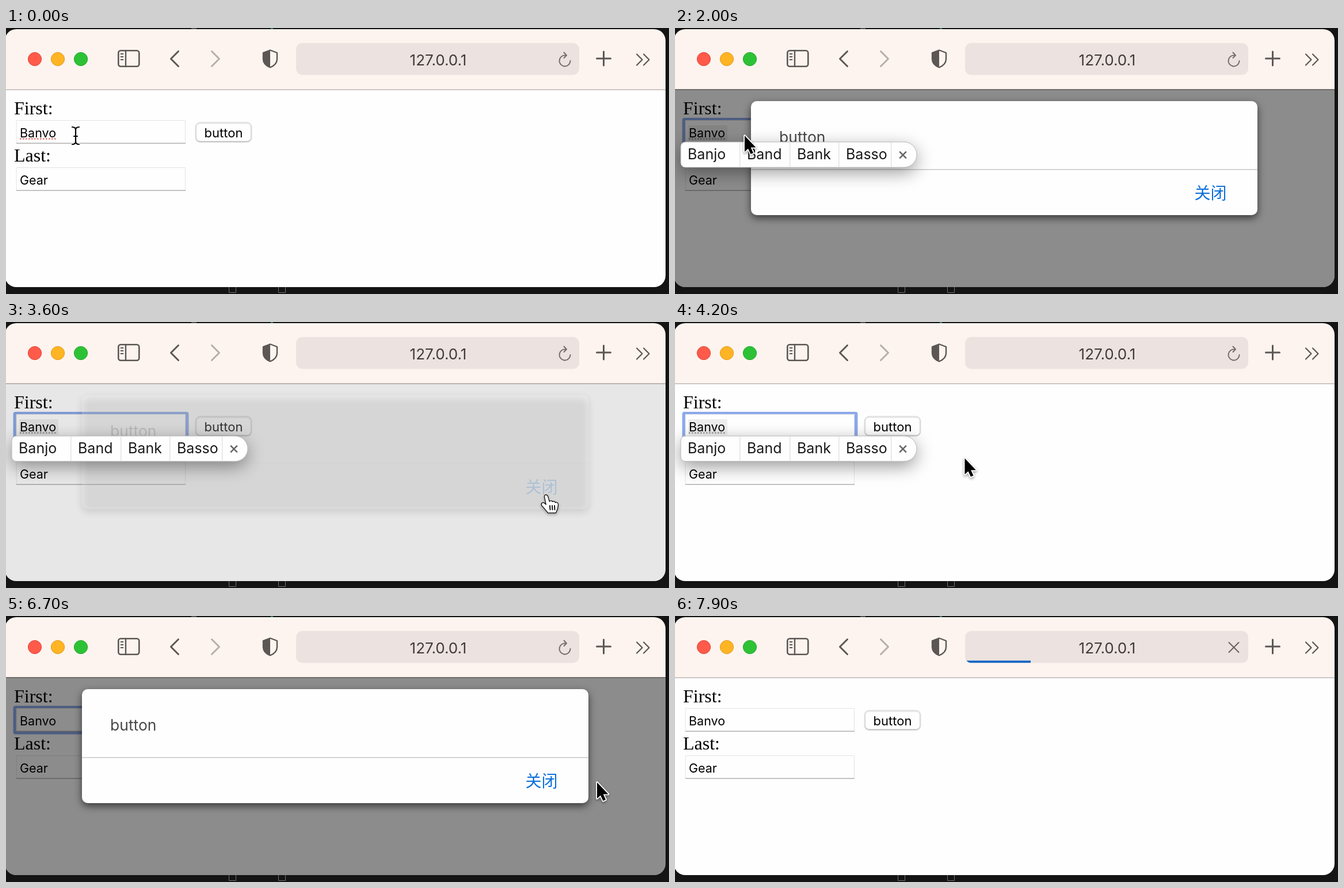
An HTML page with a canvas for the animation above (8000 ms loop, 1152 by 462 pixels).

```html
<!DOCTYPE html>
<html lang="en">
<head>
<meta charset="utf-8">
<title>Browser form</title>
<style>
html, body { margin: 0; width: 100%; height: 100%; overflow: hidden; background: #141414; }
canvas { display: block; width: 1152px; height: 462px; }
</style>
</head>
<body>
<canvas id="stage" width="1152" height="462"></canvas>
<script>
const ctx = document.getElementById('stage').getContext('2d');
const LOOP = 8000, STEP = 100;
const SANS = 'Inter, sans-serif', SERIF = '"Liberation Serif", serif', CJK = '"Noto Sans CJK SC", sans-serif';
const PAGE = '#fefefe', ICON = '#5c5754', RING = '#8ba9ea';

const clamp = v => Math.max(0, Math.min(1, v));
const ramp = (t, from, to) => clamp((t - from) / (to - from));
const ease = v => v * v * (3 - 2 * v);
const within = (t, from, to) => t >= from && t < to;

function scoped(draw) {
  ctx.save();
  draw();
  ctx.restore();
}

function text(str, x, y, size, color, family = SANS, align = 'left') {
  ctx.font = `${size}px ${family}`;
  ctx.textAlign = align;
  ctx.fillStyle = color;
  ctx.fillText(str, x, y);
}

function rect(x, y, w, h, color) {
  ctx.fillStyle = color;
  ctx.fillRect(x, y, w, h);
}

function box(x, y, w, h, r, fill, stroke, width = 1) {
  ctx.beginPath();
  ctx.roundRect(x, y, w, h, r);
  if (fill) { ctx.fillStyle = fill; ctx.fill(); }
  if (stroke) { ctx.strokeStyle = stroke; ctx.lineWidth = width; ctx.stroke(); }
}

function line(points, color, width) {
  ctx.beginPath();
  points.forEach(([x, y]) => ctx.lineTo(x, y));
  ctx.strokeStyle = color;
  ctx.lineWidth = width;
  ctx.stroke();
}

function cross(x, y, r, color, width) {
  line([[x - r, y - r], [x + r, y + r]], color, width);
  line([[x - r, y + r], [x + r, y - r]], color, width);
}

function shadow(color, blur, y) {
  ctx.shadowColor = color;
  ctx.shadowBlur = blur;
  ctx.shadowOffsetY = y;
}

// Everything that changes over the loop.
function stateAt(t) {
  return {
    focus: ramp(t, 500, 800) * (t < 7600),
    popup: within(t, 1000, 4600),
    dialog: t < 5000 ? ramp(t, 1500, 1800) * (1 - ramp(t, 3400, 3650))
                     : ramp(t, 5750, 6050) * (1 - ramp(t, 7100, 7350)),
    misspelt: t < 1000,
    reload: ramp(t, 7500, 7900)
  };
}

const ROUTE = [
  [0, 121, 187], [2050, 121, 187], [3100, 938, 301], [3700, 938, 301], [4400, 396, 221],
  [4700, 396, 221], [5500, 270, 181], [6200, 270, 181], [6700, 1027, 289], [7000, 938, 295], [LOOP, 938, 295]
];

function pointerAt(t) {
  const i = ROUTE.findIndex(([end]) => t < end);
  const [t0, x0, y0] = ROUTE[i - 1], [t1, x1, y1] = ROUTE[i];
  const k = ease(ramp(t, t0, t1));
  return [x0 + (x1 - x0) * k, y0 + (y1 - y0) * k];
}

function drawDesktop() {
  rect(0, 0, 1152, 462, '#141414');
  rect(322, 0, 9, 2, '#505050');
  rect(460, 0, 4, 2, '#2b7468');
  for (const x of [387, 473]) box(x + .5, 445.5, 12, 14, 0, null, '#737373');
}

function drawToolbar(s) {
  rect(0, 0, 1152, 107, '#fdf4ef');
  rect(0, 106, 1152, 1.5, '#dcd6d3');
  [['#ff5a4a', '#e2483b'], ['#ffb424', '#df9c1c'], ['#2dc235', '#22a52b']].forEach(([fill, edge], i) => {
    ctx.beginPath();
    ctx.arc(50 + i * 40, 54, 11.6, 0, 7);
    ctx.fillStyle = fill;
    ctx.fill();
    ctx.strokeStyle = edge;
    ctx.lineWidth = 1;
    ctx.stroke();
  });

  ctx.lineCap = ctx.lineJoin = 'round';
  box(195.3, 39.3, 36, 27.4, 4, null, ICON, 2.6);
  line([[208, 39], [208, 67]], ICON, 2.4);
  for (const y of [45, 50, 55]) line([[199.5, y], [203.5, y]], ICON, 1.8);
  line([[299.5, 40.5], [286.5, 53.5], [299.5, 66.5]], ICON, 3);
  line([[357.5, 40.5], [370.5, 53.5], [357.5, 66.5]], '#b5afac', 3);

  const shield = new Path2D('M459 38.5 L471 43 V54 C471 62 465 66 459 68.5 C453 66 447 62 447 54 V43 Z');
  ctx.strokeStyle = ICON;
  ctx.lineWidth = 2.4;
  ctx.stroke(shield);
  scoped(() => {
    ctx.clip(shield);
    rect(445, 36, 14, 34, ICON);
  });

  box(504, 26, 492, 55.5, 11, '#ece2df');
  text('127.0.0.1', 751, 65, 26, '#403c3a', SANS, 'center');
  if (s.reload) {
    scoped(() => {
      box(504, 26, 492, 55.5, 11);
      ctx.clip();
      rect(504, 77.5, 114 * s.reload, 4, '#0b65c4');
    });
    cross(971, 54.5, 8.5, '#66605d', 2);
  } else {
    ctx.beginPath();
    ctx.arc(971, 57, 9.5, -1.35, 0, true);
    ctx.strokeStyle = '#736d6a';
    ctx.lineWidth = 2;
    ctx.stroke();
    line([[969.5, 42.5], [974, 47.5], [969.5, 52]], '#736d6a', 2);
  }
  line([[1026.5, 53], [1050.5, 53]], ICON, 3);
  line([[1038.5, 41], [1038.5, 65]], ICON, 3);
  for (const x of [1096, 1108]) line([[x, 45.5], [x + 9.5, 55], [x, 64.5]], ICON, 2.2);
}

function drawField(y, focus) {
  if (focus) {
    scoped(() => {
      ctx.globalAlpha = focus;
      const grow = (1 - focus) * 8;
      box(12.5 - grow, y - 4 - grow, 305 + grow * 2, 49.5 + grow * 2, 4, RING);
    });
  }
  rect(18, y, 294, 40.5, PAGE);
  box(18.5, y + .5, 293, 39.5, 0, null, '#e4e4e4');
  rect(18, y + 39.5, 294, 1.5, '#b4b4b4');
}

function drawPage(s) {
  rect(0, 107.5, 1152, 350, PAGE);
  text('First:', 14, 150, 32, '#000', SERIF);
  text('Last:', 14, 232, 32, '#000', SERIF);
  drawField(160, s.focus);
  drawField(242, 0);

  if (s.popup) rect(23, 169, 68, 27, '#ededed');
  text('Banvo', 24, 190, 21.5, '#000');
  text('Gear', 24, 272, 21.5, '#000');
  if (s.misspelt || s.popup) {
    scoped(() => {
      ctx.lineCap = 'butt';
      ctx.setLineDash([2.5, 2.5]);
      line([[24, 192.5], [88, 192.5]], s.misspelt ? '#e2574c' : '#8a8a8a', 2);
    });
  }

  scoped(() => {
    shadow('rgba(0,0,0,.3)', 2, 1);
    box(330, 164, 96, 32.5, 7, PAGE, '#dedede');
  });
  text('button', 378, 190, 22, '#000', SANS, 'center');
}

function drawDialog(opacity) {
  if (!opacity) return;
  scoped(() => {
    ctx.globalAlpha = opacity;
    rect(0, 106, 1152, 350, 'rgba(0,0,0,.45)');
    scoped(() => {
      shadow('rgba(0,0,0,.6)', 14, 5);
      box(132, 127, 880, 198, 10, PAGE);
    });
    rect(132, 245, 880, 1.6, '#cbcbcb');
    text('button', 181, 198.5, 26.5, '#484848');
    text('关闭', 902.5, 297, 28, '#0b6fdc', CJK);
  });
}

function drawSuggestions() {
  scoped(() => {
    shadow('rgba(0,0,0,.4)', 30, 9);
    box(10, 198, 410, 44, [8, 22, 22, 8], PAGE);
  });
  box(10, 198, 410, 44, [8, 22, 22, 8], PAGE, '#b8b8b8');
  for (const x of [112, 199, 284, 375]) rect(x, 199, 1.4, 42, '#e2e2e2');
  [['Banjo', 22], ['Band', 125], ['Bank', 212], ['Basso', 297]]
    .forEach(([word, x]) => text(word, x, 228, 25, '#1a1a1a'));
  cross(396, 220.5, 5.8, '#666', 2.6);
}

const ARROW = new Path2D('M0 0 V28 L6 22.5 L10.5 32 L15 30 L10.7 20.5 H19.5 Z');
const HAND = new Path2D('M-2 2 C-2-1 2-1 3 2 L6 12 C8 9 11 10 11 12 C13 10 16 11 16 13.5 C18 12 21 13 21 16 L20 23 L17 30 H4 L-1 24 L-7 17 C-8 13-4 12-2 15 L1 17 Z');
const BEAM = new Path2D('M-6-15 Q0-15 0-10 Q0-15 6-15 M0-10 V10 M-6 15 Q0 15 0 10 Q0 15 6 15 M-3 1 H3');

function drawPointer(t, s) {
  if (t >= 7500) return;
  const [x, y] = pointerAt(t);
  const overClose = s.dialog > .05 && within(x, 890, 975) && within(y, 265, 335);
  const overField = s.dialog < .5 && within(x, 18, 312) && within(y, 160, 200);
  scoped(() => {
    ctx.translate(x, y);
    ctx.lineJoin = ctx.lineCap = 'round';
    if (overField) {
      ctx.strokeStyle = '#fff';
      ctx.lineWidth = 4.5;
      ctx.stroke(BEAM);
      ctx.strokeStyle = '#000';
      ctx.lineWidth = 2.2;
      ctx.stroke(BEAM);
      return;
    }
    const shape = overClose ? HAND : ARROW;
    scoped(() => {
      shadow('rgba(0,0,0,.4)', 4, 2);
      ctx.strokeStyle = overClose ? '#000' : '#fff';
      ctx.lineWidth = overClose ? 2.4 : 3.6;
      ctx.stroke(shape);
    });
    ctx.fillStyle = overClose ? '#fff' : '#000';
    ctx.fill(shape);
    if (overClose) for (const fx of [7, 11, 15]) line([[fx, 18], [fx + .5, 25]], '#000', 1.8);
  });
}

function render(t) {
  const s = stateAt(t);
  drawDesktop();
  scoped(() => {
    box(-2, 2, 1148, 448, 20);
    ctx.clip();
    drawToolbar(s);
    drawPage(s);
    drawDialog(s.dialog);
  });
  if (s.popup) drawSuggestions();
  drawPointer(t, s);
}

const start = performance.now();
function tick() {
  const t = (performance.now() - start) % LOOP;
  render(Math.floor(t / STEP) * STEP);
  requestAnimationFrame(tick);
}
tick();
</script>
</body>
</html>
```
